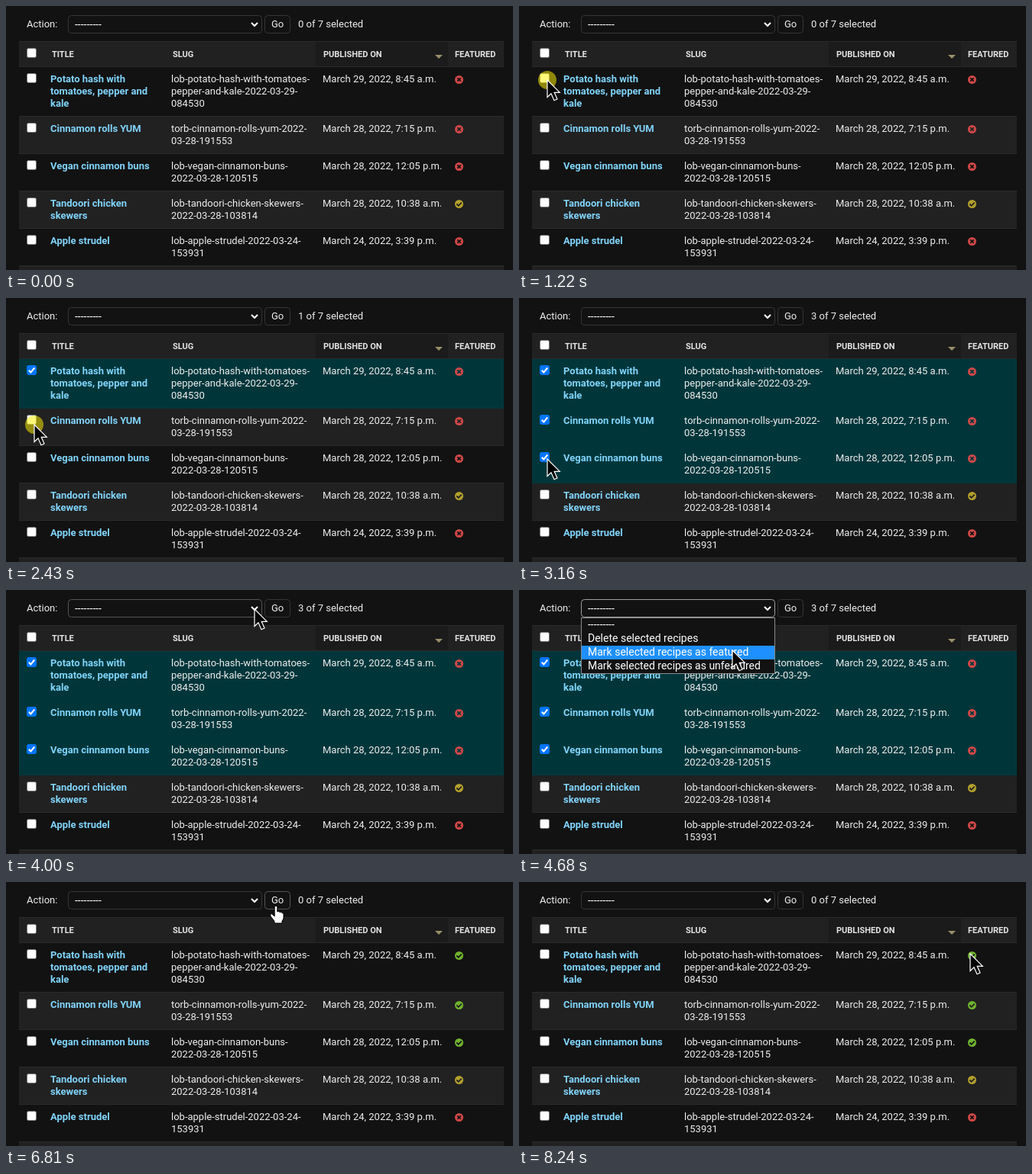
Write an HTML page that moves like this. It is 663x346 px and loops after 9.04 s.

```html
<!DOCTYPE html>
<html lang="en">
<head>
<meta charset="utf-8">
<title>Recipe admin</title>
<style>
  html, body { margin: 0; width: 100%; height: 100%; overflow: hidden; background: #121212; }
  svg { display: block; width: 663px; height: 346px; }
  text { font: 13px Roboto, Arial, sans-serif; fill: #eee; white-space: pre; }
  .link { font-weight: 700; fill: #81d4fa; }
  .head { font-size: 11px; font-weight: 700; fill: #e4e4e4; }
  .option { font-size: 14px; fill: #fff; }
</style>
</head>
<body>
<svg id="stage" viewBox="0 0 663 346" xmlns="http://www.w3.org/2000/svg"></svg>
<script>
const LOOP = 9040;
const BG = '#121212', STRIPE = '#212121', LINE = '#2a2a2a', PICKED = '#00363a';
const RED = '#d04848', GREEN = '#70b32f', YELLOW = '#b3a02c';
const stage = document.getElementById('stage');

function add(parent, tag, attrs = {}, content = '') {
  const el = document.createElementNS('http://www.w3.org/2000/svg', tag);
  for (const key in attrs) el.setAttribute(key, attrs[key]);
  el.textContent = content;
  parent.appendChild(el);
  return el;
}
const rect = (parent, x, y, width, height, fill, more) =>
  add(parent, 'rect', { x, y, width, height, fill, ...more });
const label = (parent, x, y, content, cls = '') =>
  add(parent, 'text', { x, y, class: cls }, content);
const show = (el, on) => el.setAttribute('visibility', on ? 'visible' : 'hidden');

function checkbox(x, y) {
  const box = rect(stage, x + .5, y + .5, 12, 12, '#fff', { rx: 2, stroke: '#767676' });
  const tick = add(stage, 'path', {
    d: `M${x + 2.8} ${y + 6.8}l2.6 2.7 4.9-6`, fill: 'none', stroke: '#fff', 'stroke-width': 2
  });
  return on => {
    box.setAttribute('fill', on ? '#0075ff' : '#fff');
    box.setAttribute('stroke', on ? '#0075ff' : '#767676');
    show(tick, on);
  };
}

function statusIcon(x, y) {
  const disc = add(stage, 'circle', { cx: x, cy: y, r: 5.5 });
  const mark = add(stage, 'path', { fill: 'none', stroke: BG, 'stroke-width': 1.8 });
  return (color, back) => {
    disc.setAttribute('fill', color);
    mark.setAttribute('stroke', back);
    mark.setAttribute('d', color === RED
      ? `M${x - 2.2} ${y - 2.2}l4.4 4.4m0-4.4l-4.4 4.4`
      : `M${x - 3.2} ${y}l2.4 2.3 4-4.1`);
  };
}

// Toolbar
rect(stage, 0, 0, 663, 346, BG);
label(stage, 27, 28, 'Action:');
const selectBox = rect(stage, 81.5, 12.5, 253, 23, BG, { rx: 4 });
const choice = label(stage, 90, 29, '', 'option');
add(stage, 'path', { d: 'M321 22l4 4 4-4', fill: 'none', stroke: '#fff', 'stroke-width': 2 });
const goBox = rect(stage, 338.5, 12.5, 33, 23, BG, { rx: 4 });
label(stage, 347, 28, 'Go');
const counter = label(stage, 382, 28, '');

// Table head
rect(stage, 17, 46, 634, 34, STRIPE);
rect(stage, 405, 46, 173, 34, '#1b1b1b');
rect(stage, 17, 46, 634, 1, LINE);
rect(stage, 17, 79, 634, 1, LINE);
checkbox(27, 55)(false);
[[60, 'TITLE'], [218, 'SLUG'], [415, 'PUBLISHED ON'], [587, 'FEATURED']]
  .forEach(([x, name]) => label(stage, x, 67, name, 'head'));
add(stage, 'path', { d: 'M561 64h10l-5 5z', fill: '#999068' });

// Table body
const rows = [
  { top: 80, title: 'Potato hash with|tomatoes, pepper and|kale',
    slug: 'lob-potato-hash-with-tomatoes-|pepper-and-kale-2022-03-29-|084530', date: 'March 29, 2022, 8:45 a.m.' },
  { top: 145, title: 'Cinnamon rolls YUM',
    slug: 'torb-cinnamon-rolls-yum-2022-|03-28-191553', date: 'March 28, 2022, 7:15 p.m.' },
  { top: 194, title: 'Vegan cinnamon buns',
    slug: 'lob-vegan-cinnamon-buns-|2022-03-28-120515', date: 'March 28, 2022, 12:05 p.m.' },
  { top: 243, title: 'Tandoori chicken|skewers',
    slug: 'lob-tandoori-chicken-skewers-|2022-03-28-103814', date: 'March 28, 2022, 10:38 a.m.' },
  { top: 292, title: 'Apple strudel',
    slug: 'lob-apple-strudel-2022-03-24-|153931', date: 'March 24, 2022, 3:39 p.m.' }
];
rows.forEach((row, i) => {
  const { top } = row, height = i ? 49 : 65;
  row.back = i % 2 ? STRIPE : BG;
  row.fill = rect(stage, 17, top, 634, height, row.back);
  row.line = rect(stage, 17, top + height - 1, 634, 1, LINE);
  row.check = checkbox(27, top + 8);
  const lines = (x, content, cls) => content.split('|')
    .forEach((part, n) => label(stage, x, top + 20 + 16 * n, part, cls));
  lines(58, row.title, 'link');
  lines(216, row.slug);
  lines(414, row.date);
  row.icon = statusIcon(592.5, top + 16.5);
});
rect(stage, 17, 341, 634, 5, STRIPE);

// Drop-down list
const options = ['---------', 'Delete selected recipes',
  'Mark selected recipes as featured', 'Mark selected recipes as unfeatured'];
const menu = add(stage, 'g');
rect(menu, 81.5, 36.5, 253, 73, BG, { stroke: '#8a8a8a' });
const hoverBar = rect(menu, 82, 37, 252, 18, '#1e90ff');
options.forEach((name, i) => label(menu, 90, 50 + 18 * i, name, 'option'));

// Pointer
const halo = add(stage, 'circle', { r: 12, fill: '#fff000', 'fill-opacity': .53 });
const arrow = add(stage, 'path', {
  d: 'M0 0V22.5L5 17.8 9 26.8 13 25 9.2 16.3H16.3Z', fill: '#000', stroke: '#fff', 'stroke-width': 1.2
});
const hand = add(stage, 'path', {
  d: 'M-1.8 1.5Q0-1 1.8 1.5V8Q4 6.5 5 8.7 7 7.6 8 9.7 10 9 10 11.5V16Q10 18 8 20V23H-2V20.5' +
     'L-6.5 14.5Q-8.5 11-5.5 10.8L-1.8 14Z',
  fill: '#fff', stroke: '#000', 'stroke-width': 1
});

const easeOut = p => 1 - (1 - p) ** 2;
const easeInOut = p => p * p * (3 - 2 * p);

// start, end, steps, destination, easing, optional curve control point
const moves = [
  [190, 1080, 14, [37, 97], easeOut],
  [1350, 1960, 10, [37, 176], easeInOut],
  [2090, 2360, 5, [37, 166], easeInOut],
  [2630, 3020, 7, [37, 211], easeInOut],
  [3300, 4060, 12, [331, 21], easeInOut],
  [4400, 4680, 5, [279, 79], easeInOut],
  [4750, 5010, 5, [274, 82], easeOut],
  [5280, 5680, 7, [353, 31], easeInOut],
  [7140, 8030, 14, [639, 155], easeInOut, [560, 375]],
  [8110, 8240, 3, [590, 94], easeOut]
];
const clicks = [[1150, 1280], [2360, 2490], [3020, 3160], [4270, 4400], [5150, 5280], [5680, 5810]];
const pickTimes = [1280, 2490, 3160];
const OPENED = 4400, CHOSEN = 5280, RELOADED = 6810;

function pointerAt(t) {
  let pos = [228, 362];
  for (const [start, end, steps, to, ease, via] of moves) {
    if (t < start) break;
    const gap = (end - start) / (steps - 1);
    const step = Math.min(steps, Math.floor((t - start) / gap + 1e-6) + 1);
    const p = ease(step / steps), from = pos;
    pos = from.map((a, i) => {
      const mid = via ? via[i] : (a + to[i]) / 2;
      return a * (1 - p) ** 2 + 2 * mid * p * (1 - p) + to[i] * p * p;
    });
  }
  return pos.map(Math.round);
}

function draw(t) {
  const [x, y] = pointerAt(t);
  const reloaded = t >= RELOADED, open = t >= OPENED && t < CHOSEN;
  const picked = i => !reloaded && t >= pickTimes[i];

  rows.forEach((row, i) => {
    const on = picked(i), back = on ? PICKED : row.back;
    row.fill.setAttribute('fill', back);
    show(row.line, !on);
    row.check(on);
    row.icon(i === 3 ? YELLOW : reloaded && i < 3 ? GREEN : RED, back);
  });
  counter.textContent = `${rows.filter((_, i) => picked(i)).length} of 7 selected`;

  const overGo = x >= 338 && x <= 372 && y >= 12 && y <= 36;
  const overSelect = x >= 81 && x <= 335 && y >= 12 && y <= 36;
  goBox.setAttribute('stroke', overGo ? '#555' : '#353535');
  selectBox.setAttribute('stroke', open ? '#a0a0a0' : overSelect ? '#555' : '#353535');
  choice.textContent = options[t >= CHOSEN && !reloaded ? 2 : 0];
  show(menu, open);
  show(hoverBar, open);
  hoverBar.setAttribute('y', 37 + 18 * Math.max(0, Math.min(3, Math.floor((y - 37) / 18))));

  const place = `translate(${x} ${y})`;
  [halo, arrow, hand].forEach(el => el.setAttribute('transform', place));
  show(halo, clicks.some(([from, to]) => t >= from && t < to));
  show(hand, overGo);
  show(arrow, !overGo && t >= 190);
}

const began = performance.now();
function tick() {
  draw((performance.now() - began) % LOOP);
  requestAnimationFrame(tick);
}
tick();
</script>
</body>
</html>
```
